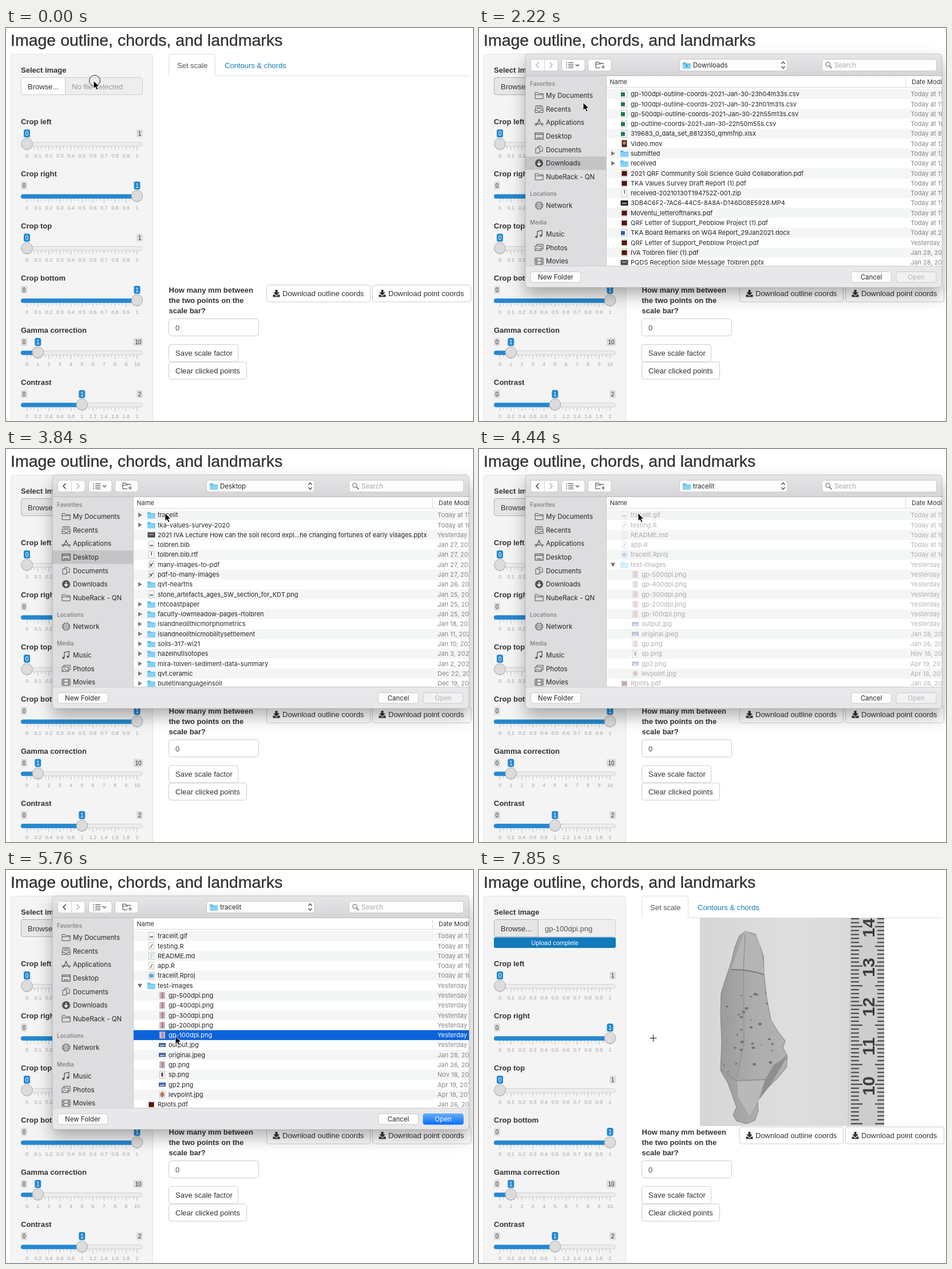
These frames come from a looping animation (816 by 686 pixels, 7990 ms). An HTML page:

```html
<!DOCTYPE html>
<html lang="en">
<head>
<meta charset="utf-8">
<title>Image outline</title>
<style>
html, body { margin: 0; width: 100%; height: 100%; overflow: hidden; background: #fff; }
svg { display: block; width: 816px; height: 686px; }
text { font: 13px "Liberation Sans", Arial, sans-serif; fill: #333; white-space: pre; }
.title { font-size: 28.5px; stroke: #333; stroke-width: .35; }
.b { font-weight: bold; }
.mid { text-anchor: middle; }
.tiny { font-size: 10px; }
.grid { font-size: 9px; fill: #a2a2a2; }
.mac text { font: 11px Inter, sans-serif; fill: #262626; }
.mac .side { font-size: 11.5px; }
.mac .head { font-size: 10px; font-weight: 500; fill: #7c7c7e; }
.mac .date { fill: #858585; }
.mac .white text, .mac text.white { fill: #fff; }
.mac .pale { fill: #b6b6b6; }
.frame { filter: drop-shadow(0 14px 14px rgba(0, 0, 0, .3)); }

/* 54 equal steps per loop */
.t { animation: 7990ms step-end -12ms infinite; }
.ring { animation-name: ring; }
.hand { animation-name: hand; }
.arrow { animation-name: arrow; }
.cross { animation-name: cross; }
.pressed { animation-name: pressed; }
.mac { animation-name: mac; }
.downloads { animation-name: first; }
.desktop { animation-name: second; }
.folder { animation-name: third; }
.back { animation-name: back; }
.open { animation-name: open; }
.desktop .dim { animation-name: wake1; }
.folder .dim { animation-name: wake2; }
.desktop .sel { animation-name: sel1; }
.folder .sel { animation-name: sel2; }
.done { animation-name: done; }
.edge { animation-name: edge; }
.photo { animation-name: photo; }
.move { animation-name: move; }
.names { --dim: .36; }
.dates { --dim: .62; }

@keyframes ring { 0% { opacity: 1 } 1.852%, 100% { opacity: 0 } }
@keyframes hand { 0%, 18.519%, 98.148%, 100% { opacity: 0 } 7.407%, 74.074% { opacity: 1 } }
@keyframes arrow { 0%, 18.519% { opacity: 1 } 7.407%, 74.074%, 100% { opacity: 0 } }
@keyframes cross { 0% { opacity: 0 } 98.148%, 100% { opacity: 1 } }
@keyframes pressed { 0% { opacity: 0 } 12.963%, 100% { opacity: 1 } }
@keyframes mac { 0%, 74.074%, 100% { opacity: 0 } 18.519% { opacity: 1 } }
@keyframes first { 0% { opacity: 1 } 38.889%, 100% { opacity: 0 } }
@keyframes second { 0%, 55.556%, 100% { opacity: 0 } 38.889% { opacity: 1 } }
@keyframes third { 0% { opacity: 0 } 55.556%, 100% { opacity: 1 } }
@keyframes back { 0% { opacity: .35 } 38.889%, 100% { opacity: 1 } }
@keyframes open { 0%, 55.556% { opacity: 0 } 51.852%, 70.37%, 100% { opacity: 1 } }
@keyframes wake1 { 0% { opacity: var(--dim) } 44.444%, 100% { opacity: 1 } }
@keyframes wake2 { 0% { opacity: var(--dim) } 59.259%, 100% { opacity: 1 } }
@keyframes sel1 { 0% { opacity: 0 } 51.852%, 100% { opacity: 1 } }
@keyframes sel2 { 0% { opacity: 0 } 70.37%, 100% { opacity: 1 } }
@keyframes done { 0% { opacity: 0 } 75.926%, 100% { opacity: 1 } }
@keyframes edge { 0%, 83.333%, 100% { opacity: 0 } 75.926% { opacity: 1 } }
@keyframes photo { 0% { opacity: 0 } 83.333%, 100% { opacity: 1 } }
@keyframes move {
  0% { transform: translate(153px, 92px); animation-timing-function: steps(5) }
  9.259% { transform: translate(69px, 92px) }
  18.519% { transform: translate(69px, 92px); animation-timing-function: steps(5) }
  27.778% { transform: translate(182px, 130px); animation-timing-function: steps(2) }
  31.481% { transform: translate(158px, 152px); animation-timing-function: steps(2) }
  35.185% { transform: translate(152px, 180px) }
  40.741% { transform: translate(178px, 167px); animation-timing-function: steps(4) }
  48.148% { transform: translate(278px, 112px) }
  55.556% { transform: translate(278px, 112px); animation-timing-function: steps(6) }
  66.667%, 100% { transform: translate(296px, 290px) }
}
</style>
</head>
<body>
<svg id="stage" viewBox="0 0 816 686"></svg>
<script>
const BLUE = '#2488d1', LINK = '#127abd';

const box = (x, y, w, h, fill, stroke = 'none', r = 0) =>
  `<rect x="${x}" y="${y}" width="${w}" height="${h}" rx="${r}" fill="${fill}" stroke="${stroke}"/>`;
const txt = (x, y, s, cls = '', fill = '') =>
  `<text x="${x}" y="${y}" class="${cls}"${fill && ` style="fill:${fill}"`}>${s}</text>`;
const path = (d, stroke = '#555', fill = 'none', w = 1) =>
  `<path d="${d}" stroke="${stroke}" fill="${fill}" stroke-width="${w}"/>`;
const dot = (x, y, r, fill, stroke = 'none') =>
  `<circle cx="${x}" cy="${y}" r="${r}" fill="${fill}" stroke="${stroke}"/>`;
const group = (cls, s, x = 0, y = 0) =>
  `<g class="${cls}" transform="translate(${x} ${y})">${s}</g>`;
const list = (n, f) => Array.from({ length: n }, (_, i) => f(i)).join('');

// ---- page ----
function bubble(x, y, s, on) {
  const w = 5.5 + 5.5 * String(s).length;
  return box(x - w / 2, y + 14, w, 14, on ? BLUE : '#dcdcdc', 'none', 3) +
    txt(x, y + 24.6, s, 'tiny mid', on ? '#fff' : '#333');
}

function slider(y, label, value, max) {
  const x = 36.5 + 192.5 * value / max;
  let s = txt(26, y + 4.5, label, 'b');
  s += box(26.5, y + 36.5, 212, 7, '#ececec', '#d0d0d0', 4);
  if (value) s += box(26, y + 36.3, x - 26, 7.4, BLUE, 'none', 3.5) + bubble(31.5, y, 0);
  if (value < max) s += bubble(max > 9 ? 231 : 233.5, y, max);
  s += list(31, i => {
    const tx = 36.5 + i * 192.5 / 30, big = i % 3 === 0;
    return path(`M${tx} ${y + 44}v${big ? 6.5 : 4}`, big ? '#8dbde3' : '#b9b9b9', 'none', .9);
  });
  s += list(11, i => txt(36.5 + i * 19.25, y + 63, +(i * max / 10).toFixed(1), 'grid mid'));
  return s + bubble(x, y, value, true) +
    dot(x, y + 40.3, 10, 'rgba(0,0,0,.12)') + dot(x, y + 39.2, 9.8, '#dcdcdc', '#a9a9a9');
}

const button = (x, y, w, s) =>
  box(x + .5, y + .5, w, 30, '#fff', '#ccc', 4) + txt(x + 12, y + 20, s);
const download = (x, s) => box(x + .5, 448.5, x < 500 ? 181 : 172, 29.5, '#fff', '#ccc', 4) +
  path(`M${x + 15.5} 457h4v4.5h3.5l-5.5 5.5l-5.5-5.5h3.5zM${x + 11.5} 465.5h3l3 3l3-3h3v4h-12z`, 'none', '#333') +
  txt(x + 28, 468, s);

function page() {
  return txt(8, 31, 'Image outline, chords, and landmarks', 'title') +
    box(8.5, 45.5, 248, 700, '#f4f4f4', '#e3e3e3', 4) +
    txt(26, 77.5, 'Select image', 'b') +
    box(26.5, 86.5, 212, 30, '#eee', '#ccc', 4) +
    path('M103.5 86.5h-73a4 4 0 0 0-4 4v22a4 4 0 0 0 4 4h73z', '#ccc', '#fff') +
    group('t pressed', path('M103.5 86.5h-73a4 4 0 0 0-4 4v22a4 4 0 0 0 4 4h73z', '#b0b0b0', '#e6e6e6')) +
    txt(38, 106.5, 'Browse...') + txt(115, 106.5, 'No file selected', '', '#999') +
    group('t done', box(105, 88, 132, 28, '#eee') + txt(115, 106.5, 'gp-100dpi.png', '', '#555') +
      box(26, 117.5, 213, 18.5, LINK, 'none', 3) +
      `<text x="132.5" y="130.5" class="mid" style="fill:#fff;font-size:11px">Upload complete</text>`) +
    slider(163, 'Crop left', 0, 1) + slider(254, 'Crop right', 1, 1) +
    slider(345, 'Crop top', 0, 1) + slider(436, 'Crop bottom', 1, 1) +
    slider(527, 'Gamma correction', 1, 10) + slider(618, 'Contrast', 1, 2) +
    path('M284 83.5h.5v-34a4 4 0 0 1 4-4h73a4 4 0 0 1 4 4v34h444.5', '#ddd') +
    txt(299, 69.5, 'Set scale', '', '#555') + txt(382, 69.5, 'Contours &amp; chords', '', LINK) +
    ['How many mm between', 'the two points on the', 'scale bar?']
      .map((s, i) => txt(284.5, 461.5 + 18 * i, s, 'b')).join('') +
    box(284.5, 507.5, 157, 30, '#fff', '#ccc', 4) + txt(296, 527.5, '0', '', '#555') +
    button(284, 552, 121, 'Save scale factor') + button(284, 582.5, 136, 'Clear clicked points') +
    download(455, 'Download outline coords') + download(640, 'Download point coords');
}

// ---- loaded picture ----
function photo() {
  let seed = 7;
  const rnd = () => (seed = seed * 16807 % 2147483647) / 2147483647;
  const stone = 'M465 107L483 112L488 125L497 150L498 182L503 225L510 262L523 283L535 298L531 310L539 325L537 345' +
    'L520 365L505 380L487 403L488 420L482 437L468 443L450 438L444 428L450 414L443 394L435 372L422 350' +
    'L424 300L422 250L423 215L431 190L441 160L447 135L455 115z';
  const tick = (x, y, w) => box(x, y, w, 2.2, '#4a4a4a');
  return `<clipPath id="pic">${box(386, 84, 322, 363, '#fff')}</clipPath>
    <clipPath id="stone">${path(stone)}</clipPath>
    <linearGradient id="paper"><stop stop-color="#d6d6d6"/><stop offset=".5" stop-color="#dedede"/><stop offset="1" stop-color="#d8d8d8"/></linearGradient>
    <linearGradient id="rock"><stop stop-color="#9b9b9b"/><stop offset=".5" stop-color="#adadad"/><stop offset="1" stop-color="#b2b2b2"/></linearGradient>
    <g clip-path="url(#pic)">` +
    box(386, 84, 322, 363, 'url(#paper)') +
    path(stone, '#808080', 'url(#rock)') +
    `<g clip-path="url(#stone)">` +
    path('M441 172L499 180L488 118L465 105z', 'none', '#b5b5b5') +
    path('M539 325L505 382L487 403L500 366L515 340z', 'none', '#8f8f8f') +
    path('M450 366L500 366L489 402L473 432L452 396z', '#979797', '#b9b9b9') +
    path('M441 174Q470 173 499 183', '#747474', 'none', 1.6) +
    path('M465 112L462 178L463 300L450 364M422 348L450 368L500 366L538 322', '#8e8e8e', 'none', 1.3) +
    list(34, () => {
      const x = 428 + rnd() * 92, y = 195 + rnd() * 158, r = 1 + rnd() * 2.3;
      return `<ellipse cx="${x}" cy="${y}" rx="${r}" ry="${r * .75}" fill="#757575"/>`;
    }) + '</g>' +
    path('M645 84L650 84L645 447', '#bbb') + box(648, 84, 60, 363, '#cdcdcd') +
    list(54, i => {
      const y = 84 + i * 6.88, long = i % 5 === 2;
      return tick(650, y, long ? 20 : 14) + tick(long ? 692 : 696, y, 16);
    }) +
    [14, 13, 12, 11, 10].map((n, i) =>
      `<text transform="translate(691 ${101 + 69 * i}) rotate(-90)" class="b mid" style="font-size:30px;fill:#3c3c3c">${n}</text>`).join('') +
    '</g>';
}

// ---- file dialog ----
const FOLDER = path('M-7-5h5l1.5 2h7.5v9h-14z', 'none', '#5dbdf0') + box(-7, -1.8, 14, 7.6, '#86d2f8');
const sheet = s => box(-4.5, -6, 9, 12, '#fff', '#c4c4c4') + s;
const thumb = (w, h, c, s = '') => box(-w / 2, -h / 2, w, h, c) + s;
const ICONS = {
  d: FOLDER,
  x: sheet(box(-6, -3, 7, 7, '#1f7a48')),
  w: sheet(box(-6, -3, 7, 7, '#2b62b8')),
  p: sheet(box(-4.5, -4, 9, 8.5, '#551310')),
  j: sheet(dot(0, 0, 4, '#62a8dc')),
  z: sheet(box(-.5, -5, 1.5, 6, '#555')),
  t: sheet(path('M-2.5-3h5M-2.5 0h5M-2.5 3h4', '#7f9ac0')),
  r: sheet(path('M-2 4l4-7', '#8aa46a', 'none', 2)),
  g: sheet(box(-3, 0, 6, 3, '#7e8aa6')),
  e: sheet(path('M-3 4l6-7M-3-2l4 5', '#555', 'none', 1.4)),
  v: thumb(9, 12, '#43261f', dot(0, -1, 3, '#c67b5c')),
  m: thumb(13, 9, '#222', box(-4, -1, 8, 3, '#8a8a8a')),
  k: thumb(13, 9, '#44464a', box(-4, -2, 8, 3, '#85868a')),
  i: thumb(10, 12, '#cfb4c0', box(-1, -5, 3, 10, '#a5849a')),
  o: thumb(12, 7, '#3d5f9c', box(-4, 0, 8, 2, '#bcd0e8')),
  s: sheet(`<ellipse rx="1.8" ry="4" fill="#555"/>`),
  l: sheet(`<ellipse rx="3.5" ry="4.5" fill="#b27a58"/>`)
};

// one line per row: kind, name, date; ">" marks a nested row
const parse = s => s.trim().split('\n').map(line => {
  const [, deep, kind, name, date] = line.match(/^(>?)(\S) (.*)\|(.*)$/);
  return { deep, kind, name, date };
});
const DOWNLOADS = parse(`
x gp-100dpi-outline-coords-2021-Jan-30-23h04m33s.csv|Today at 11:04
x gp-100dpi-outline-coords-2021-Jan-30-23h01m31s.csv|Today at 11:01
x gp-500dpi-outline-coords-2021-Jan-30-22h55m13s.csv|Today at 10:55
x gp-outline-coords-2021-Jan-30-22h50m55s.csv|Today at 10:50
x 319683_0_data_set_8812350_qmmfnp.xlsx|Today at 8:20
v Video.mov|Today at 12:40
d submitted|Today at 12:31
d received|Today at 12:30
p 2021 QRF Community Soil Science Guild Collaboration.pdf|Today at 11:52
p TKA Values Survey Draft Report (1).pdf|Today at 11:50
z received-20210130T194752Z-001.zip|Today at 11:47
m 3DB4C6F2-7AC6-44C5-8A8A-D146D08E5928.MP4|Today at 11:45
p MoVentu_letterofthanks.pdf|Today at 11:40
p QRF Letter of Support_Pebblow Project (1).pdf|Today at 11:32
w TKA Board Remarks on WG4 Report_29Jan2021.docx|Today at 2:10
p QRF Letter of Support_Pebblow Project.pdf|Yesterday at
p IVA Tolbren flier (1).pdf|Jan 28, 2021
k PQDS Reception Slide Message Tolbren.pptx|Jan 28, 2021`);
const DESKTOP = parse(`
d tracelit|Today at 11:05
d tka-values-survey-2020|Today at 10:12
k 2021 IVA Lecture How can the soil record expl...he changing fortunes of early villages.pptx|Yesterday at
g tolbren.bib|Jan 27, 2021
z tolbren.bib.rtf|Jan 27, 2021
e many-images-to-pdf|Jan 27, 2021
e pdf-to-many-images|Jan 27, 2021
d qvt-hearths|Jan 26, 2021
g stone_artefacts_ages_SW_section_for_KDT.png|Jan 25, 2021
d rhtcoastpaper|Jan 25, 2021
d faculty-lowmeadow-pages-rtolbren|Jan 25, 2021
d islandneolithicmorphometrics|Jan 18, 2021
d islandneolithicmobilitysettlement|Jan 11, 2021
d soils-317-wi21|Jan 10, 2021
d hazelnutisotopes|Jan 3, 2021
d mira-tolven-sediment-data-summary|Jan 2, 2021
d qvt.ceramic|Dec 22, 2020
d bulletinlanguageinsoil|Dec 19, 2020`);
const PROJECT = parse(`
g tracelit.gif|Today at 11:05
r testing.R|Today at 10:58
t README.md|Today at 10:50
r app.R|Today at 10:48
j tracelit.Rproj|Today at 10:30
d test-images|Yesterday at
>i gp-500dpi.png|Yesterday at
>i gp-400dpi.png|Yesterday at
>i gp-300dpi.png|Yesterday at
>i gp-200dpi.png|Yesterday at
>i gp-100dpi.png|Yesterday at
>o output.jpg|Yesterday at
>o original.jpeg|Jan 28, 2021
>i gp.png|Jan 26, 2021
>s sp.png|Nov 18, 2020
>o gp2.png|Apr 19, 2019
>l levpoint.jpg|Apr 18, 2019
p Rplots.pdf|Jan 26, 2021`);

const rowY = i => 115.3 + 17.29 * i;
const nameOf = (r, i) => {
  const x = r.deep ? 273 : 254;
  return group('', ICONS[r.kind], x, rowY(i)) + txt(x + 11, rowY(i) + 4, r.name);
};
const dateOf = (r, i) => txt(754, rowY(i) + 4, r.date, 'date');

function view(cls, title, mark, rows, pick) {
  const open = cls === 'folder';
  let s = mark ? box(81, mark - 11.7, 142, 23.4, '#c4c3c6') : '';
  s += group('', FOLDER, 363, 65) + txt(374, 69, title, 'side');
  if (cls === 'downloads') s += path('M363 62v5m-2-2l2 2.5l2-2.5', '#2b83b8');
  s += '<g clip-path="url(#files)">' + box(223, 104, 586, 311, '#fff');
  s += rows.map((r, i) => i % 2 ? '' : box(223, rowY(i) - 8.65, 586, 17.3, '#f4f5f5')).join('');
  s += rows.map((r, i) => r.kind !== 'd' ? '' : open
    ? path(`M230 ${rowY(i) - 3}h8l-4 7z`, 'none', '#707070')
    : path(`M231 ${rowY(i) - 4}v8l7-4z`, 'none', '#7d7d7d')).join('');
  s += group('t dim names', rows.map(nameOf).join(''));
  s += group('t dim dates', rows.map(dateOf).join(''));
  if (pick >= 0) {
    const y = rowY(pick), r = rows[pick];
    s += group('t sel white', box(223, y - 8.65, 586, 17.3, '#0b63dc') + nameOf(r, pick) + dateOf(r, pick) +
      (r.kind === 'd' ? path(`M231 ${y - 4}v8l7-4z`, 'none', '#fff') : ''));
  }
  return group('t ' + cls, s + '</g>');
}

const OUTLINE = path('M-7-5.5h5l1.5 2h7.5v9h-14zM-7-1.5h14');
const PLACES = [
  [118, 'My Documents', OUTLINE],
  [141.5, 'Recents', path('M-5.5-6h11l1.5 8v4h-14v-4zM-7 2h4l1 2h4l1-2h4M-4-3.5h8M-4.5-1h9')],
  [165, 'Applications', path('M-6 6l7-12M6 6l-7-12M-8 2.5h10M5 2.5h3', '#555', 'none', 1.4)],
  [188.7, 'Desktop', path('M-7-5.5h14v11h-14zM-7-3h14M-4 3h8', '#555', 'none', 1.3)],
  [212.3, 'Documents', path('M-6-3h7v9h-7zM-2-3v-3h5l3 3v6h-5')],
  [236, 'Downloads', dot(0, 0, 7, '#505052') + path('M0-4v7m-3-3l3 3.5l3-3.5', '#fff', 'none', 1.6)],
  [259.6, 'NubeRack - QN', OUTLINE],
  [310, 'Network', dot(0, 0, 6.5, '#8c8c8e', '#555') + path('M-6.5 0h13M0-6.5v13M-4.5-4q4.5 3 9 0M-4.5 4q4.5-3 9 0M0-6.5q-6 6.5 0 13M0-6.5q6 6.5 0 13', '#e4e4e4', 'none', .7)],
  [360, 'Music', path('M-3 4v-9l8-2v9', '#555', 'none', 1.3) + dot(-4.8, 4.5, 2, '#555') + dot(3.2, 2.5, 2, '#555')],
  [383.5, 'Photos', box(-4, -6, 11, 8, 'none', '#555') + box(-7, -3, 11, 8, '#dddcde', '#555') + path('M-6 4l3-4l3 3l2-1l2 2')],
  [407.2, 'Movies', path('M-7-5.5h14v11h-14zM-4-5.5v11M4-5.5v11M-4 0h8M-7-2h3M-7 2h3M4-2h3M4 2h3')]
];

const pill = (x, w, y = 54.5, h = 20.5, fill = '#fdfdfd') => box(x, y, w, h, fill, '#c9c8ca', 4);

function dialog() {
  return `<clipPath id="files">${box(223, 84, 586, 331, '#fff')}</clipPath>
    <clipPath id="win">${box(81, 45, 728, 408, '#fff', 'none', 6)}</clipPath>
    <linearGradient id="bar" x2="0" y2="1"><stop stop-color="#e6e5e7"/><stop offset="1" stop-color="#d5d4d6"/></linearGradient>
    <linearGradient id="go" x2="0" y2="1"><stop stop-color="#64aefb"/><stop offset="1" stop-color="#0a6ffa"/></linearGradient>
    <g class="frame">${box(81, 45, 728, 408, '#e8e7e9', 'none', 6)}</g><g clip-path="url(#win)">` +
    box(81, 45, 728, 39, 'url(#bar)') + box(81, 84, 142, 331, '#dddcde') +
    box(223, 84, 586, 331, '#fff') + box(81, 415, 728, 38, '#e8e7e9') +
    pill(90.5, 47.5) + path('M114.5 55v20', '#d5d5d5') +
    group('t back', path('M104.5 60l-4.5 4.7l4.5 4.7', '#444', 'none', 1.5)) +
    path('M123.5 60l4.5 4.7l-4.5 4.7', '#b0b0b0', 'none', 1.5) +
    pill(144.5, 40.5) + path('M152 60.5h2M156 60.5h9M152 63.5h2M156 63.5h9M152 66.5h2M156 66.5h9M152 69.5h2M156 69.5h9M169 63.5l3 3l3-3', '#4a4a4a', 'none', 1.2) +
    pill(190.5, 40.5) + path('M204 69.5v-10h5l1.5 2h6.5v2M204 69.5h8M204 63h9M217 65v6M214 68h6', '#4a4a4a', 'none', 1.1) +
    pill(350.5, 188.5) + path('M528.5 62.5l3-3.5l3 3.5M528.5 67l3 3.5l3-3.5', '#444', 'none', 1.3) +
    pill(599.5, 200) + dot(609.5, 63.5, 3.8, 'none', '#555') + path('M612.3 66.3l4 4', '#555', 'none', 1.4) +
    txt(621, 69, 'Search', 'side', '#aaa') +
    view('downloads', 'Downloads', 236, DOWNLOADS, -1) +
    view('desktop', 'Desktop', 188.7, DESKTOP, 0) +
    view('folder', 'tracelit', 0, PROJECT, 10) +
    txt(89, 101, 'Favorites', 'head') + txt(89, 293, 'Locations', 'head') + txt(89, 343, 'Media', 'head') +
    PLACES.map(([y, s, icon]) => group('', icon, 105, y) + txt(117, y + 4.2, s, 'side')).join('') +
    txt(228.5, 97.5, 'Name', '', '#333') + txt(756, 97.5, 'Date Modified', '', '#333') +
    path('M745.5 86v17M223 103.5h586', '#dadada') +
    path('M81 83.5h728', '#bcbbbd') + path('M81 415.5h728', '#cccbcd') + path('M222.5 84v331', '#c9c8ca') +
    pill(90.5, 87.5, 425.5, 18.5) + txt(134, 438.5, 'New Folder', 'side mid') +
    pill(650.5, 70, 425.5, 18.5) + txt(685.5, 438.5, 'Cancel', 'side mid') +
    pill(729, 70, 425.5, 18.5, '#f1f0f2') + txt(764, 438.5, 'Open', 'side mid pale') +
    group('t open', box(728.5, 425, 71, 19.5, 'url(#go)', 'none', 4) + txt(764, 438.5, 'Open', 'side mid white')) +
    '</g>' + box(81, 45, 728, 408, 'none', 'rgba(0,0,0,.16)', 6);
}

// ---- pointer ----
function pointer() {
  return `<g class="t ring">${dot(155, 92, 9.5, 'none', '#222')}</g><g class="t move">` +
    group('t arrow', path('M0 0v14l3.2-3l2.3 5l2.5-1.1l-2.3-4.9h4.4z', '#fff', '#000')) +
    group('t hand', path('M-2 1.5q0-2 1.7-2t1.8 2v4.5l5.5 1.2q2 .5 2 2.8v2.5q0 2.5-1.2 4h-6.3l-4.3-5.5q-2-2.6-.8-3.3t1.6 1.2z', '#111', '#fff', 1.1) +
      path('M2 10v3.5M4.2 10v3.5M6.4 10v3.5', '#333', 'none', .8)) +
    '</g>' + group('t cross', path('M298.5 293.5h12M304.5 287.5v12', '#111'));
}

document.getElementById('stage').innerHTML =
  page() + group('t photo', photo()) + group('t edge', box(815, 0, 1, 639, '#444')) +
  group('t mac', dialog()) + pointer();
</script>
</body>
</html>
```
